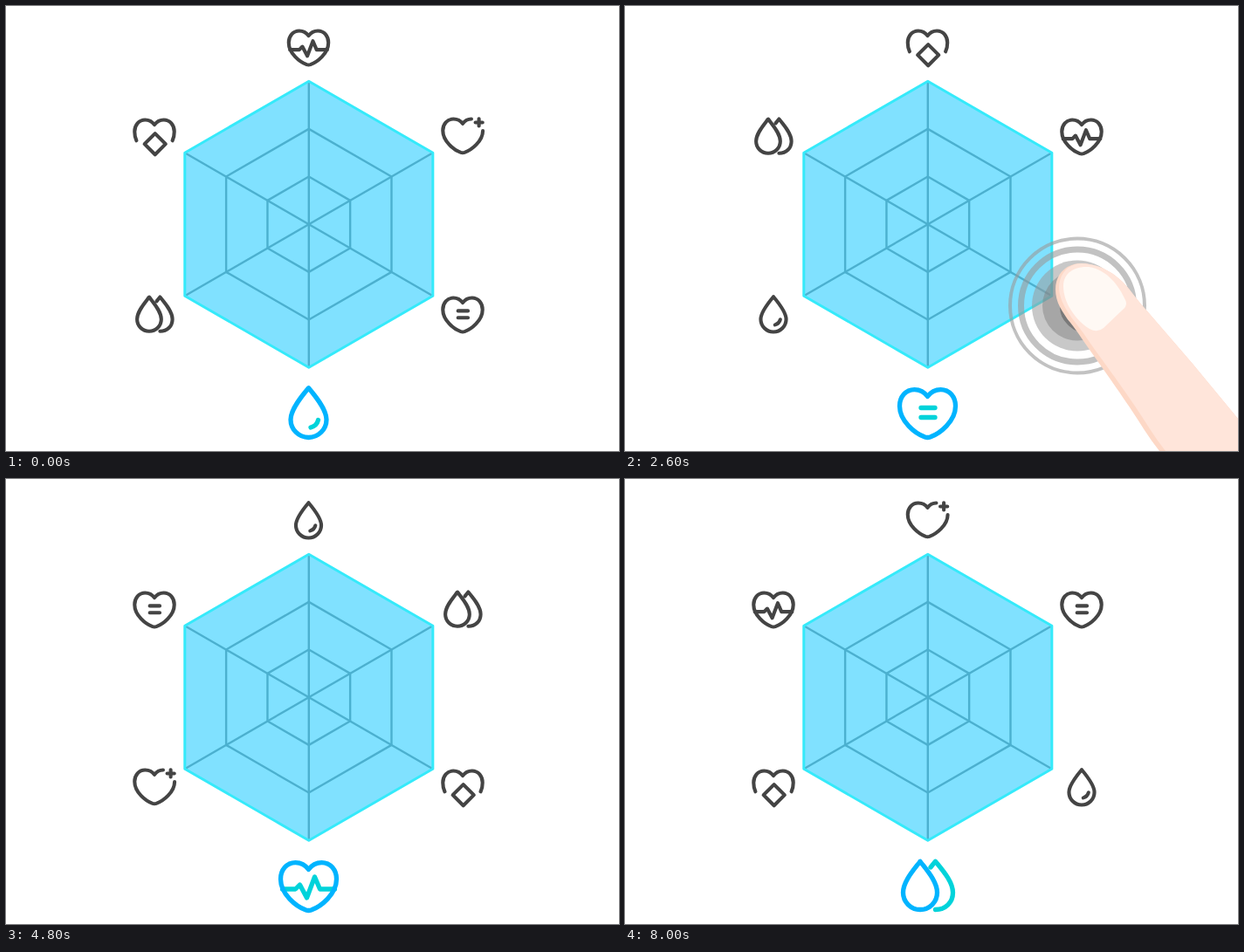
An HTML page for the animation above (9 s loop, 702 by 510 pixels).

```html
<!DOCTYPE html>
<html lang="en">
<head>
<meta charset="utf-8">
<title>Health radar</title>
<style>
  html, body { margin: 0; width: 100%; height: 100%; overflow: hidden; background: #fff; }
  svg { display: block; width: 702px; height: 510px; }
  .icon { fill: none; stroke: #444; stroke-width: 5.8; stroke-linecap: round; stroke-linejoin: round; }
  .icon.active { stroke: #00b4ff; stroke-width: 5.3; }
  .icon.active .accent { stroke: #00d3da; }
</style>
</head>
<body>
<svg viewBox="0 0 702 510">
  <g id="radar" stroke-linejoin="round"></g>
  <g id="icons"></g>
  <g id="rings">
    <g fill="none" stroke="#999" stroke-opacity=".6">
      <circle cx="518" cy="343.5" r="77" stroke-width="4"/>
      <circle cx="518" cy="343.5" r="64.5" stroke-width="7"/>
    </g>
    <circle cx="518" cy="343.5" r="52" fill="#999" fill-opacity=".54"/>
    <circle cx="518" cy="343.5" r="40" fill="#808080" fill-opacity=".47"/>
  </g>
  <g id="finger">
    <path fill="#fdd8c6" d="M493 325C493 306 506 295 523 295C546 296 565 308 580 328C587 337 593 344 600 352L650 410L702 473V510H612C600 495 590 478 578 460C556 427 540 406 519 375C506 357 493 344 493 325Z"/>
    <path fill="#ffe5da" d="M497 322C498 306 508 295 523 295C546 296 565 308 580 328C587 337 593 344 600 352L650 410L702 473V510H619C607 495 597 478 585 460C563 427 546 406 525 375C511 357 497 340 497 322Z"/>
    <path fill="#fff9f4" d="M502 321C502 306 515 298 531 299C552 302 566 321 573 337Q576 343 570 348L548 369Q541 375 532 370C516 360 502 340 502 321Z"/>
  </g>
</svg>
<script>
const LOOP = 9000, STEP = 1600, TAP_START = 1000, BLINK = 200;
const CENTER = { x: 346.8, y: 250.2 }, RADIUS = 164;
const $ = id => document.getElementById(id);

// Slots run clockwise from the bottom: x, y, scale
const slots = [
  [346.5, 467, 1], [170, 354, .71], [170, 150, .71],
  [346.5, 48, .71], [523, 150, .71], [523, 354, .71]
];

const heart = "M0 -19.5C-4 -25 -10 -27.4 -15 -27.4C-25 -27.4 -32 -19 -32 -8.5" +
  "C-32 9 -14 23 -3 27Q0 28 3 27C14 23 32 9 32 -8.5" +
  "C32 -19 25 -27.4 15 -27.4C10 -27.4 4 -25 0 -19.5Z";

// Each icon: main outline, accent, vertical shift when small
const icons = [
  ["M0 -29.3C-7 -21 -20.5 -5 -20.5 7A20.5 20.5 0 0 0 20.5 7C20.5 -5 7 -21 0 -29.3Z",
   "M11 7.5Q9.5 14 2.5 16", 0],
  ["M-8.5 -28.8C-15 -20 -28 -6 -28 7A19.5 19.5 0 0 0 11 7C11 -6 -2 -20 -8.5 -28.8Z",
   "M3.5 -22L9 -28.8C16 -20 29 -6 29 7C29 18 21 26.5 9 26.5", 0],
  ["M-29 6C-31 2 -32 -3 -32 -8.5C-32 -19 -25 -27.4 -15 -27.4C-10 -27.4 -4 -25 0 -19.5" +
   "C4 -25 10 -27.4 15 -27.4C25 -27.4 32 -19 32 -8.5C32 -3 31 2 29 6",
   "M1 -5.5L18 11.5L1 28.5L-16 11.5Z", 0],
  [heart, "M-30 3H-15L-10 -2L-2 13L7 -11L13 3H30", 0],
  ["M32.5 -7C32.5 10 14 24 3 28Q0 29 -3 28C-14 24 -32 10 -32 -7.5C-32 -18 -25 -26 -15 -26" +
   "C-10 -26 -4 -24 0 -18.5C4 -24 9 -26 14 -26", "M20.5 -20.5H32M26.2 -26.3V-14.7", -2],
  [heart, "M-7.5 -6.5H8.5M-7.5 4.5H8.5", 0]
];

function add(parent, tag, attrs) {
  const node = document.createElementNS("http://www.w3.org/2000/svg", tag);
  for (const key in attrs) node.setAttribute(key, attrs[key]);
  return parent.appendChild(node);
}

function corners(r) {
  return Array.from({ length: 6 }, (_, i) => {
    const a = i * Math.PI / 3 - Math.PI / 2;
    return [CENTER.x + r * Math.cos(a), CENTER.y + r * Math.sin(a)];
  });
}

function drawRadar() {
  const g = $("radar");
  const line = { fill: "none", stroke: "#4bb0cf", "stroke-width": 2.4 };
  const outer = corners(RADIUS);
  add(g, "polygon", { points: outer.join(" "), fill: "#80e1ff" });
  for (const k of [1, 2]) {
    add(g, "polygon", { points: corners(RADIUS * k / 3).join(" "), ...line });
  }
  for (let i = 0; i < 3; i++) add(g, "path", { d: `M${outer[i]}L${outer[i + 3]}`, ...line });
  add(g, "polygon", { points: outer.join(" "), fill: "none", stroke: "#35eafa", "stroke-width": 3 });
}

drawRadar();
const iconNodes = icons.map(([main, accent]) => {
  const g = add($("icons"), "g", { class: "icon" });
  // The accent sits behind the outline so overlaps stay in the main colour
  add(g, "path", { d: accent, class: "accent" });
  add(g, "path", { d: main });
  return g;
});

function render(time) {
  const t = time % LOOP;
  const step = Math.floor(t / STEP);
  const tap = t % STEP - TAP_START;

  iconNodes.forEach((node, i) => {
    const slot = (i + step) % 6;
    const [x, y, scale] = slots[slot];
    const shift = slot ? icons[i][2] : 0;
    node.setAttribute("transform", `translate(${x} ${y + shift}) scale(${scale})`);
    node.classList.toggle("active", slot === 0);
  });

  const ringsOn = tap >= 0 && Math.floor(tap / BLINK) % 2 === 0;
  $("finger").style.display = tap >= 0 ? "" : "none";
  $("rings").style.display = ringsOn ? "" : "none";
}

const start = performance.now();
function tick() {
  render(performance.now() - start);
  requestAnimationFrame(tick);
}
tick();
</script>
</body>
</html>
```
